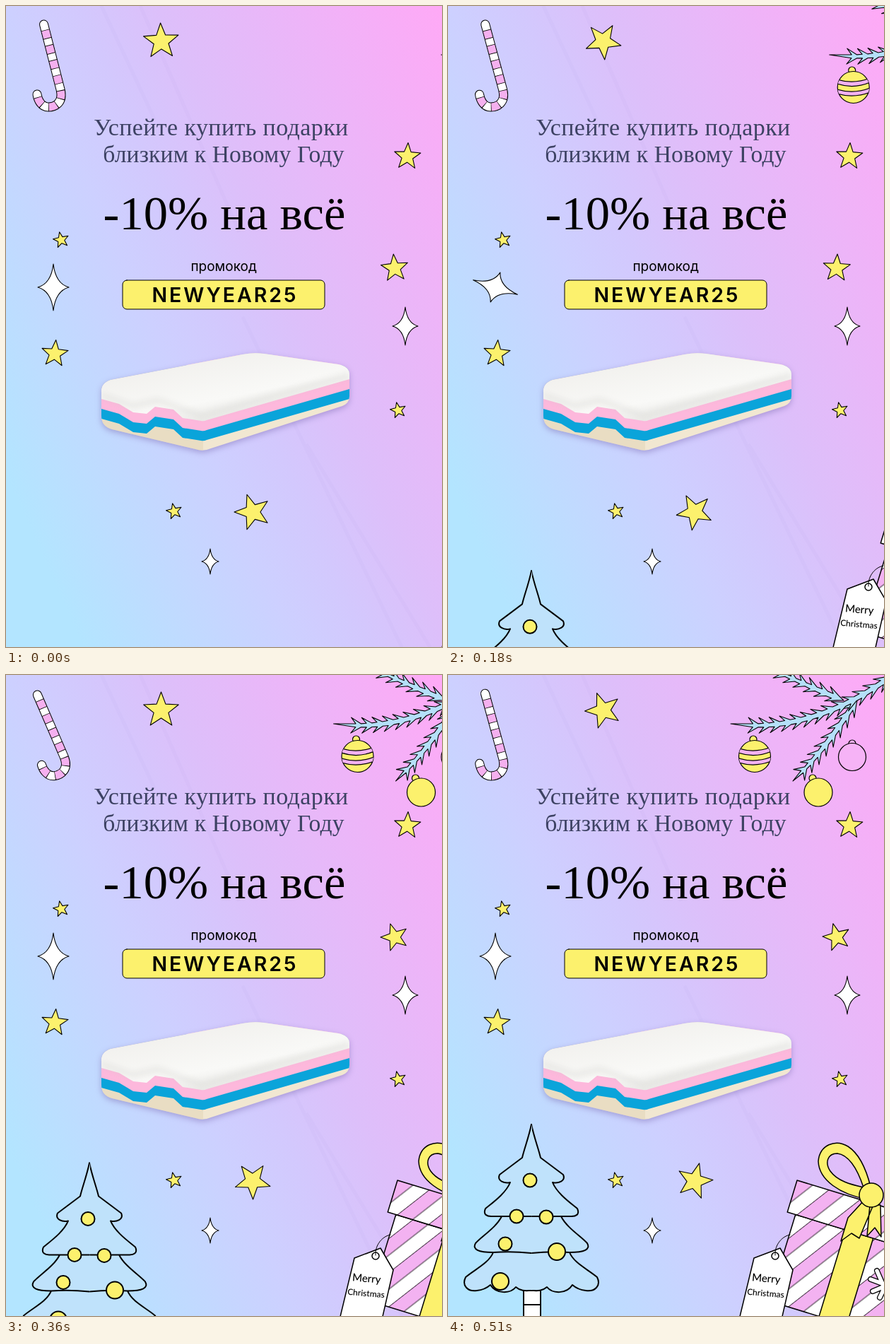
An HTML page that plays this animation: 617 px wide and 907 px high, repeating every 1010 ms.

```html
<!DOCTYPE html>
<html lang="ru">
<head>
<meta charset="utf-8">
<title>Новый Год</title>
<style>
html, body { margin: 0; width: 100%; height: 100%; overflow: hidden; }
svg { display: block; width: 617px; height: 907px; }
.serif { font-family: "Liberation Serif", serif; }
.sans { font-family: Inter, sans-serif; }
.line { stroke: #000; stroke-linejoin: round; stroke-linecap: round; }
</style>
</head>
<body>
<svg viewBox="0 0 617 907" fill="none">
  <defs>
    <linearGradient id="sky" gradientUnits="userSpaceOnUse" x1="-249" y1="112" x2="516" y2="-232">
      <stop offset="0" stop-color="#b3e5ff"/>
      <stop offset=".33" stop-color="#cdd0ff"/>
      <stop offset=".44" stop-color="#d3c8fd"/>
      <stop offset=".56" stop-color="#ddbffa"/>
      <stop offset="1" stop-color="#ffa9f6"/>
    </linearGradient>
    <linearGradient id="foam" gradientUnits="userSpaceOnUse" x1="290" y1="490" x2="310" y2="590">
      <stop offset="0" stop-color="#f1f0ed"/>
      <stop offset=".65" stop-color="#f9f9f7"/>
      <stop offset="1" stop-color="#e6e6e3"/>
    </linearGradient>
    <pattern id="lidStripes" width="40" height="38" patternUnits="userSpaceOnUse" patternTransform="rotate(-55)">
      <rect width="40" height="38" fill="#fff"/>
      <rect width="40" height="19" fill="#f3b2f1"/>
      <path d="M0 .4H40M0 19H40" stroke="#000" stroke-width=".8"/>
    </pattern>
    <pattern id="boxStripes" href="#lidStripes" patternTransform="rotate(-55) translate(0 19)"/>
    <clipPath id="block">
      <path id="body" d="M135 546Q134 534 148 529L335 493Q350 490 365 492L470 507Q486 510 486 521V552Q486 562 476 566L290 626Q279 631 268 627L150 599Q135 595 135 580Z"/>
    </clipPath>
    <path id="layer" d="M120 480V552L135 556 160 563 180 575 199 577 211 567 237 571 250 583 276 587Q280 588 284 586L486 528 500 524V480Z"/>
    <filter id="blur" x="-20%" y="-30%" width="140%" height="160%"><feGaussianBlur stdDeviation="4"/></filter>
    <clipPath id="bauble"><circle cx="434" cy="115" r="22.5"/></clipPath>
    <g id="half">
      <path fill="#bfe2fb" d="M-1 0H0C4 19 10 34 13 47L45 71C49 80 38 84 30 82C36 97 54 110 65 119C69 128 62 130 57 130H42C50 146 70 158 79 168C84 177 75 181 54 181C60 196 80 205 93 216C99 228 90 237 77 235Q66 234 58 227C50 240 30 240 22 230C14 237 6 235 -1 235Z"/>
      <path class="line" stroke-width="2" d="M0 0C4 19 10 34 13 47L45 71C49 80 38 84 30 82C36 97 54 110 65 119C69 128 62 130 57 130H0M42 130C50 146 70 158 79 168C84 177 75 181 54 181Q28 179 0 182M54 181C60 196 80 205 93 216C99 228 90 237 77 235Q66 234 58 227C50 240 30 240 22 230C14 237 6 235 0 235"/>
    </g>
    <path id="cane" d="M53.5 26L77 118C82 138 68 143 60 143C50 143 45 133 44 125"/>
  </defs>

  <rect width="617" height="907" fill="url(#sky)"/>
  <path d="M190 0L330 320M135 0L210 160M335 440L560 907M425 620L600 907" stroke="#a99be0" stroke-width="5" opacity=".07"/>

  <g text-anchor="middle">
    <g class="serif" fill="#3d4263">
      <text x="304.5" y="183" font-size="34" letter-spacing=".4">Успейте купить подарки</text>
      <text x="308" y="221" font-size="33.6" letter-spacing=".15">близким к Новому Году</text>
      <text x="309" y="316" font-size="68.6" fill="#000">-10% на всё</text>
    </g>
    <g class="sans" fill="#000">
      <text x="308" y="375" font-size="19">промокод</text>
      <rect class="line" x="165" y="388" width="286" height="41" rx="6" fill="#fcf16d"/>
      <text x="310" y="419" font-size="28.5" font-weight="600" letter-spacing="3">NEWYEAR25</text>
    </g>
  </g>

  <use href="#body" y="3" fill="#7b6bb0" opacity=".5" filter="url(#blur)"/>
  <g clip-path="url(#block)">
    <rect x="130" y="485" width="360" height="150" fill="#f1e7d1"/>
    <path d="M130 560L279 590V635H130Z" fill="#d9c9a8" opacity=".35"/>
    <use href="#layer" y="28" fill="#0aa4da"/>
    <use href="#layer" y="14" fill="#fdb8dc"/>
    <use href="#layer" fill="url(#foam)"/>
    <path d="M135 551L180 566 215 558 276 580 486 522" stroke="#c9c9c4" stroke-width="5" opacity=".45" filter="url(#blur)"/>
  </g>

  <g id="candy">
    <use href="#cane" stroke="#000" stroke-width="13" stroke-linecap="round"/>
    <use href="#cane" stroke="#fff" stroke-width="11" stroke-linecap="round"/>
    <use href="#cane" stroke="#000" stroke-width="12" stroke-dasharray="12.6 9.4" stroke-dashoffset="-8.2"/>
    <use href="#cane" stroke="#f5b0ef" stroke-width="11" stroke-dasharray="11 11" stroke-dashoffset="-9"/>
  </g>
  <g id="stars" class="line" stroke-width="1.1"></g>

  <g id="fir">
    <g id="twigs" class="line" fill="#b5e0f9" stroke-width="1.1"></g>
    <g class="line" stroke-width="1.2" fill="#fcf16d">
      <circle cx="432" cy="91" r="5"/>
      <circle cx="434" cy="115" r="22.5"/>
      <path clip-path="url(#bauble)" fill="#f3b2f1" d="M408 103Q434 112 460 101V107Q434 119 408 109ZM408 117Q434 126 460 115V121Q434 132 408 123Z"/>
      <circle cx="516" cy="146" r="5"/>
      <circle cx="524" cy="166" r="20"/>
      <g fill="#f6b3f6"><circle cx="572" cy="97" r="5"/><circle cx="572" cy="116" r="19.5"/></g>
    </g>
  </g>

  <g id="tree">
    <g transform="translate(118 636)">
      <path class="line" d="M-11 232H13V290H-11ZM-11 255H13" fill="#fff" stroke-width="2"/>
      <use href="#half"/>
      <use href="#half" transform="scale(-1 1)"/>
    </g>
    <g id="balls" class="line" fill="#fcf16d" stroke-width="2"></g>
  </g>

  <g id="gift" class="line" stroke-width="1.5">
    <g transform="translate(494 715) rotate(17)">
      <path d="M12 47H200V175H12Z" fill="url(#boxStripes)"/>
      <path d="M86 47H127V175H86Z" fill="#fcf16d"/>
      <path d="M0 0H200V47H0Z" fill="url(#lidStripes)"/>
    </g>
    <path fill="#fcf16d" d="M590 742L566 768 556 801 571 790 582 797 601 752ZM597 750L593 794 604 782 613 795 612 750Z"/>
    <path fill="#fcf16d" fill-rule="evenodd" d="M594 742C555 735 525 715 524 688C526 665 548 656 566 667C583 678 592 700 598 724ZM588 725C578 695 566 679 551 677C537 677 533 690 541 702C551 716 570 721 588 725Z"/>
    <circle cx="599" cy="736" r="17" fill="#fcf16d"/>
    <path d="M598 855L625 865M601 872L625 862M607 843L620 873M611 881L622 858" stroke-width="8"/>
    <path d="M598 855L625 865M601 872L625 862M607 843L620 873M611 881L622 858" stroke="#fff" stroke-width="5.5"/>
    <path fill="#fff" d="M433 825L470 811 488 842 472 912H412Z"/>
    <circle cx="463" cy="822" r="5" fill="#fff"/>
    <path stroke-width="1" d="M463 821C462 806 473 794 484 792"/>
    <g transform="translate(450 858) rotate(5)" fill="#000" stroke="none" text-anchor="middle"
       font-family="Lato, sans-serif" font-weight="500">
      <text y="1" font-size="15">Merry</text>
      <text x="1" y="21" font-size="12">Christmas</text>
    </g>
  </g>
</svg>
<script>
const $ = id => document.getElementById(id);
function add(parent, tag, attrs) {
  const el = document.createElementNS('http://www.w3.org/2000/svg', tag);
  for (const name in attrs) el.setAttribute(name, attrs[name]);
  return parent.appendChild(el);
}
const place = (el, x, y, turn) => el.setAttribute('transform', `translate(${x} ${y}) rotate(${turn})`);

function star(x, y, size, turn) {
  const points = [];
  for (let i = 0; i < 10; i++) {
    const a = i * Math.PI / 5, r = i % 2 ? size * .42 : size;
    points.push([r * Math.sin(a), -r * Math.cos(a)]);
  }
  const el = add($('stars'), 'polygon', {points: points.join(' '), fill: '#fcf16d'});
  place(el, x, y, turn);
  return el;
}

function sparkle(x, y, w, h) {
  const a = w * .1, b = h * .4, c = w * .45, e = h * .1;
  const d = `M0 ${-h}C${a} ${-b} ${c} ${-e} ${w} 0C${c} ${e} ${a} ${b} 0 ${h}`
    + `C${-a} ${b} ${-c} ${e} ${-w} 0C${-c} ${-e} ${-a} ${-b} 0 ${-h}Z`;
  const el = add($('stars'), 'path', {d, fill: '#fff'});
  place(el, x, y, 0);
  return el;
}

// Needled twig along a quadratic curve, from its tip to its base
function twig(tip, mid, base, bare) {
  const length = Math.hypot(base[0] - tip[0], base[1] - tip[1]);
  const at = (s, off) => {
    const t = s / length, u = 1 - t;
    const p = i => u * u * tip[i] + 2 * u * t * mid[i] + t * t * base[i];
    const v = i => u * (mid[i] - tip[i]) + t * (base[i] - mid[i]);
    const n = Math.hypot(v(0), v(1));
    return [p(0) - v(1) / n * off, p(1) + v(0) / n * off];
  };
  const side = sign => {
    const points = [];
    for (let s = bare; s < length; s += 16) {
      const w = sign * Math.min(3.5, 1.5 + s / 40);
      points.push(at(s - 3, w), at(s - 10, sign * 11), at(s + 5, w));
    }
    return points;
  };
  const points = [tip, ...side(1), base, ...side(-1).reverse()];
  add($('twigs'), 'polygon', {points: points.join(' ')});
}

twig([488, 150], [535, 105], [580, 32], 24);
twig([460, -8], [505, 14], [560, 36], 16);
twig([400, 69], [520, 85], [640, -8], 36);

for (const [cx, cy, r] of [[116, 715, 9.5], [97, 766, 9.5], [139, 767, 9.5], [81, 805, 9.5], [154, 816, 12], [74, 858, 12]])
  add($('balls'), 'circle', {cx, cy, r});

star(568, 213, 19.5, 3);
star(69, 492, 19.5, 5);
for (const [x, y] of [[78, 331], [555, 572], [238, 715]]) star(x, y, 11.5, -12);
const topStar = star(220, 50, 26, 0);
const sideStar = star(550, 371, 20, 0);
const lowStar = star(349, 716, 26, 0);
sparkle(565, 453, 18, 27);
sparkle(289, 786, 12, 18);
const spinner = sparkle(67, 398, 22, 33);

const keys = [0, 4, 8, 10, 12, 14, 17];
function tween(values, k) {
  const i = Math.max(1, keys.findIndex(key => key >= k));
  const f = (k - keys[i - 1]) / (keys[i] - keys[i - 1]);
  return values[i - 1] + f * (values[i] - values[i - 1]);
}

function draw(now) {
  const k = Math.min(17, Math.floor(now % 1010 / 30));
  $('tree').setAttribute('transform', `translate(0 ${18.15 * Math.max(0, 15 - k)})`);
  $('fir').setAttribute('transform', `translate(${12.7 * (17 - k)} 0)`);
  $('gift').setAttribute('transform', `translate(${12 * (17 - k)} 0)`);
  $('candy').setAttribute('transform', `rotate(${tween([0, -2, .5, -4.5, -9, -6, -1], k)} 62 85)`);
  place(topStar, 219.5, 50, tween([70, 47, 15, 8, 0, -6, -20], k));
  place(sideStar, 550, 371, tween([-5, -2, 8, 5, -18, -15, -15], k));
  place(lowStar, 349, 716, -18 + 10.4 * k);
  place(spinner, 67, 398, 18 * Math.min(10, k));
  requestAnimationFrame(draw);
}
draw(0);
</script>
</body>
</html>
```
